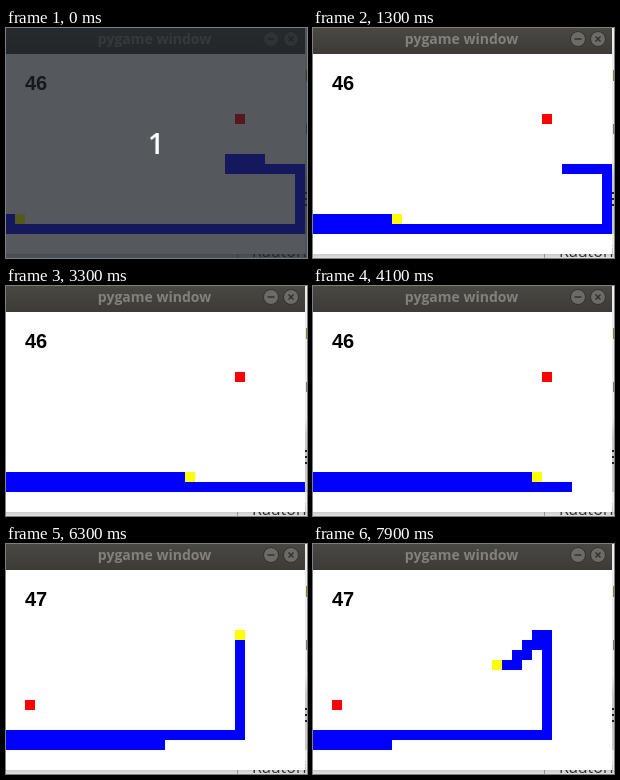
An HTML page with a canvas for the animation above (8000 ms loop, 301 by 230 pixels).

```html
<!DOCTYPE html>
<html lang="en">
<head>
<meta charset="utf-8">
<title>Snake</title>
<style>
  html, body { margin: 0; width: 100%; height: 100%; overflow: hidden; background: #fff; }
  canvas { display: block; }
</style>
</head>
<body>
<canvas id="stage" width="301" height="230"></canvas>
<script>
const ctx = document.getElementById('stage').getContext('2d');
const LOOP = 8000, STEP = 200, START = 300;
const GROWTH_STEP = 32, START_LENGTH = 49;
const STALLS = [2100, 3100]; // one tick is held here, the next one catches up

// Corners of the snake's route in [column, row], from its first tail cell on.
const corners = [
  [25, 10], [22, 10], [22, 11], [29, 11], [29, 17], [0, 17], [0, 16], [23, 16],
  [23, 6], [22, 6], [22, 7], [21, 7], [21, 8], [20, 8], [20, 9], [18, 9]
];

const route = [corners[0]];
for (const [col, row] of corners.slice(1)) {
  let [c, r] = route[route.length - 1];
  while (c !== col || r !== row) {
    c += Math.sign(col - c);
    r += Math.sign(row - r);
    route.push([c, r]);
  }
}

function rect(color, x, y, w, h) {
  ctx.fillStyle = color;
  ctx.fillRect(x, y, w, h);
}

function cell([col, row], color) {
  rect(color, col * 10 - 1, row * 10 + 26, 10, 10);
}

function text(str, x, y, font, color, align = 'left') {
  ctx.font = font;
  ctx.fillStyle = color;
  ctx.textAlign = align;
  ctx.fillText(str, x, y);
}

function gradient(y0, y1, from, to) {
  const g = ctx.createLinearGradient(0, y0, 0, y1);
  g.addColorStop(0, from);
  g.addColorStop(1, to);
  return g;
}

function drawDesktop() {
  rect('#ececeb', 0, 0, 301, 230);
  rect(gradient(130, 150, '#efefef', '#c9c9c9'), 299, 130, 2, 76);
  rect('#8a8030', 300, 42, 1, 11);
  rect('#777', 300, 96, 1, 10);
  rect('#222', 299, 164, 2, 2);
  rect('#222', 299, 170, 2, 2);
  rect('#222', 299, 176, 2, 2);
  rect('#a5a5a5', 231, 206, 1, 24);
  text('Rautori', 246, 229, '16px "Open Sans", sans-serif', '#333');
  rect(gradient(226, 230, 'rgba(0,0,0,.14)', 'rgba(0,0,0,.05)'), 0, 226, 301, 4);
}

function drawButton(x, cross) {
  ctx.beginPath();
  ctx.arc(x, 11, 7.5, 0, Math.PI * 2);
  ctx.fillStyle = '#6d6b65';
  ctx.fill();
  ctx.strokeStyle = '#33322e';
  ctx.lineWidth = 1;
  ctx.stroke();
  ctx.beginPath();
  if (cross) {
    ctx.moveTo(x - 2.5, 8.5); ctx.lineTo(x + 2.5, 13.5);
    ctx.moveTo(x + 2.5, 8.5); ctx.lineTo(x - 2.5, 13.5);
  } else {
    ctx.moveTo(x - 3.5, 11); ctx.lineTo(x + 3.5, 11);
  }
  ctx.lineWidth = 1.5;
  ctx.stroke();
}

function drawWindow() {
  rect('#fff', 0, 26, 299, 200);
  rect(gradient(0, 26, '#494843', '#3c3b37'), 0, 0, 299, 26);
  text('pygame window', 148.5, 16, 'bold 14px "Open Sans", sans-serif', '#84817a', 'center');
  drawButton(265, false);
  drawButton(285, true);
}

function stepAt(t) {
  if (t < START) return 0;
  const tick = Math.floor((t - START) / STEP);
  const held = STALLS.includes(START + tick * STEP);
  return tick + 2 - (held ? 1 : 0);
}

function drawGame(step) {
  const eaten = step >= GROWTH_STEP;
  const head = step + START_LENGTH - 1;
  const tail = step - (eaten ? 1 : 0);
  cell(eaten ? [2, 13] : [23, 6], '#f00');
  for (let i = tail; i < head; i++) cell(route[i], '#00f');
  cell(route[head], '#ff0');
  text(eaten ? '47' : '46', 19, 62, 'bold 20px "Liberation Sans", Arial, sans-serif', '#000');
}

function drawCountdown() {
  rect('rgba(29,32,38,.75)', 0, 0, 301, 230);
  text('1', 150, 126, '600 29px "Open Sans", sans-serif', '#fff', 'center');
}

function draw(t) {
  drawDesktop();
  drawWindow();
  ctx.save();
  ctx.beginPath();
  ctx.rect(0, 26, 299, 200);
  ctx.clip();
  drawGame(stepAt(t));
  ctx.restore();
  if (t < START) drawCountdown();
}

let origin;
function frame(now) {
  origin ??= now;
  draw(Math.max(0, now - origin) % LOOP);
  requestAnimationFrame(frame);
}
draw(0);
requestAnimationFrame(frame);
</script>
</body>
</html>
```
